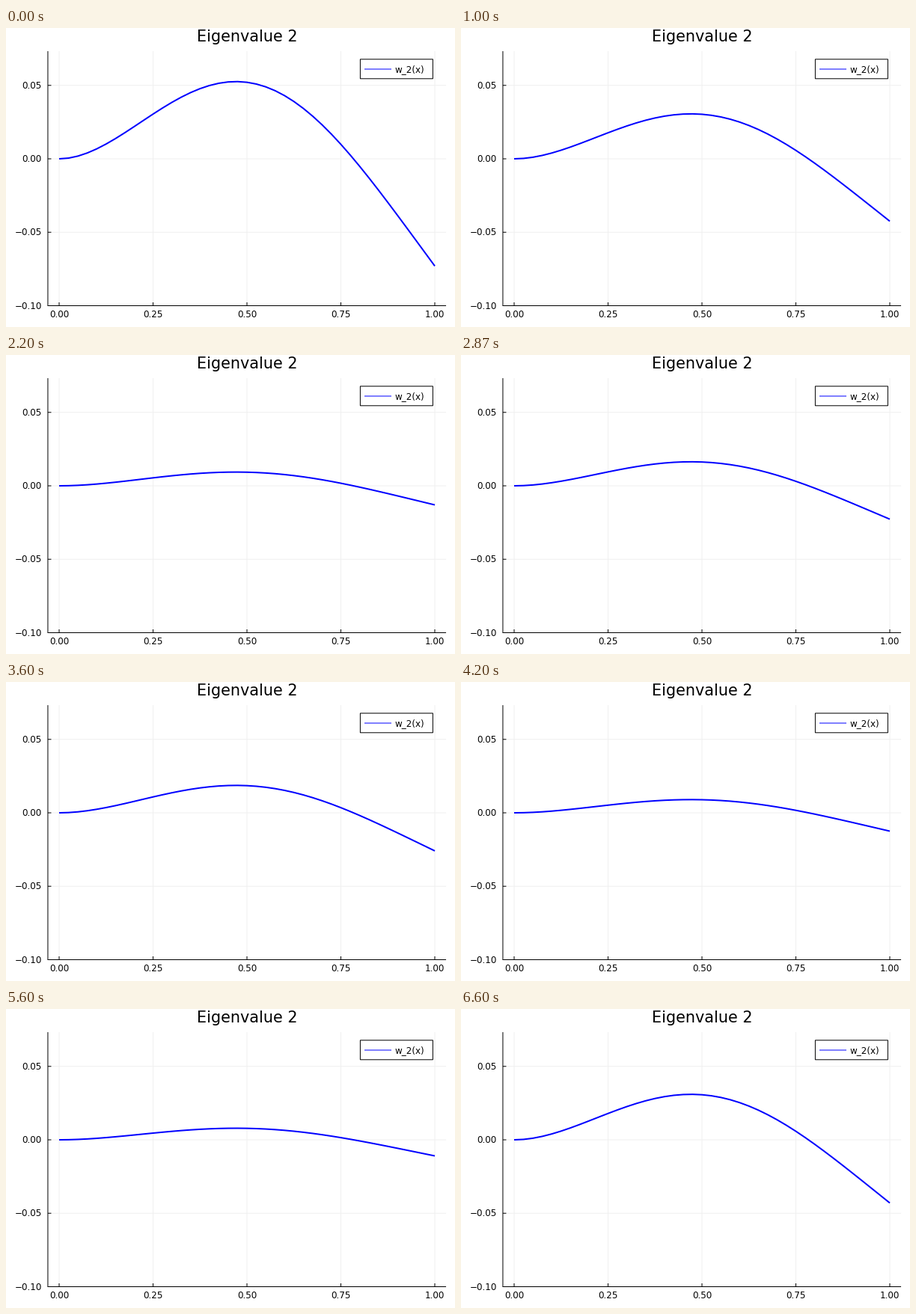
Write a matplotlib script that moves like this. It is 600x400 px and loops after 6.67 s.

```python
import numpy as np
import matplotlib.pyplot as plt
from matplotlib.animation import FuncAnimation
from matplotlib.patches import Rectangle

W, H, DPI = 600, 400, 100
PX = 72 / DPI           # one pixel in points
FRAMES, TICK = 290, 23  # redraws per loop, ms each
FPS, POSES = 15, 100    # the motion itself steps at 15 per second
TIP = 0.073             # tip deflection at the start

plt.rcParams["font.family"] = "DejaVu Sans"


def px_x(x):
    return 71 + 502 * x


def px_y(y):
    return 175 - 1965 * y


def mode_shape(x, beta=4.69409):
    """Second bending mode of a clamped-free beam, tip at -1."""
    s = (np.cosh(beta) + np.cos(beta)) / (np.sinh(beta) + np.sin(beta))
    z = beta * x
    return (np.cosh(z) - np.cos(z) - s * (np.sinh(z) - np.sin(z))) / 2


def spline_slopes(t, v, first, last):
    """Slopes of the clamped cubic spline through (t, v)."""
    n = len(t)
    h, d = np.diff(t), np.diff(v) / np.diff(t)
    m, r = np.eye(n), np.zeros(n)
    r[0], r[-1] = first, last
    for i in range(1, n - 1):
        m[i, i - 1:i + 2] = h[i], 2 * (h[i - 1] + h[i]), h[i - 1]
        r[i] = 3 * (h[i] * d[i - 1] + h[i - 1] * d[i])
    return np.linalg.solve(m, r)


# Modal amplitude over time
T = np.array([0, 11, 15, 21, 33, 42, 49, 54, 63, 72, 84, 95, 99], float)
A = np.array([1, .749, .582, .338, .178, .296, .372, .355, .171, .003,
              .150, .512, .589])
S = spline_slopes(T, A, 0, .014)


def amplitude(k):
    i = min(np.searchsorted(T, k, side="right") - 1, len(T) - 2)
    h = T[i + 1] - T[i]
    u = (k - T[i]) / h
    return ((1 + 2 * u) * (1 - u) ** 2 * A[i] + u * (1 - u) ** 2 * h * S[i]
            + u * u * (3 - 2 * u) * A[i + 1] + u * u * (u - 1) * h * S[i + 1])


fig = plt.figure(figsize=(W / DPI, H / DPI), dpi=DPI, facecolor="white")
ax = fig.add_axes([0, 0, 1, 1])
ax.set_xlim(0, W)
ax.set_ylim(H, 0)
ax.axis("off")


def line(xs, ys, color="black", width=1.0, **kw):
    return ax.plot(xs, ys, color=color, lw=width * PX, snap=False,
                   solid_capstyle="butt", **kw)[0]


def label(x, y, text, size=11.9, ha="center"):
    ax.text(x, y, text, fontsize=size * PX, ha=ha, va="baseline", zorder=6)


LEFT, RIGHT, TOP, BOTTOM = px_x(-0.03), px_x(1.03), 31, px_y(-0.1)
GRID = "#f0f0f0"

for v in np.linspace(0, 1, 5):
    x = px_x(v)
    line([x, x], [TOP, BOTTOM], GRID, zorder=1)
    line([x, x], [BOTTOM - 4.5, BOTTOM], zorder=2)
    label(x, 387.3, f"{v:.2f}")

for v in (0.05, 0.0, -0.05, -0.10):
    y = px_y(v)
    if v > -0.1:
        line([LEFT, RIGHT], [y, y], GRID, zorder=1)
    line([LEFT, LEFT + 4.5], [y, y], zorder=2)
    label(48, y + 4, f"{v:.2f}".replace("-", "\u2212"), ha="right")

line([LEFT, LEFT], [TOP, BOTTOM + .5], zorder=2)
line([LEFT, RIGHT], [BOTTOM, BOTTOM], zorder=2)
label(322, 18.3, "Eigenvalue 2", 20.8)

ax.add_patch(Rectangle((473.4, 41.8), 97, 26, fc="white", ec="black",
                       lw=PX, snap=False, zorder=4))
line([479, 515], [55, 55], "blue", zorder=5)
label(520, 59.4, "w_2(x)", ha="left")

xs = np.linspace(0, 1, 41)
shape = TIP * mode_shape(xs)
curve = line(px_x(xs), px_y(shape), "blue", 2, zorder=3)


def update(n):
    end = (n + 1) * TICK - 1
    pose = min(end * FPS // 1000, POSES - 1)
    curve.set_ydata(px_y(amplitude(pose) * shape))
    return (curve,)


anim = FuncAnimation(fig, update, frames=FRAMES, interval=TICK,
                     repeat=True, repeat_delay=0)
plt.show()
```
